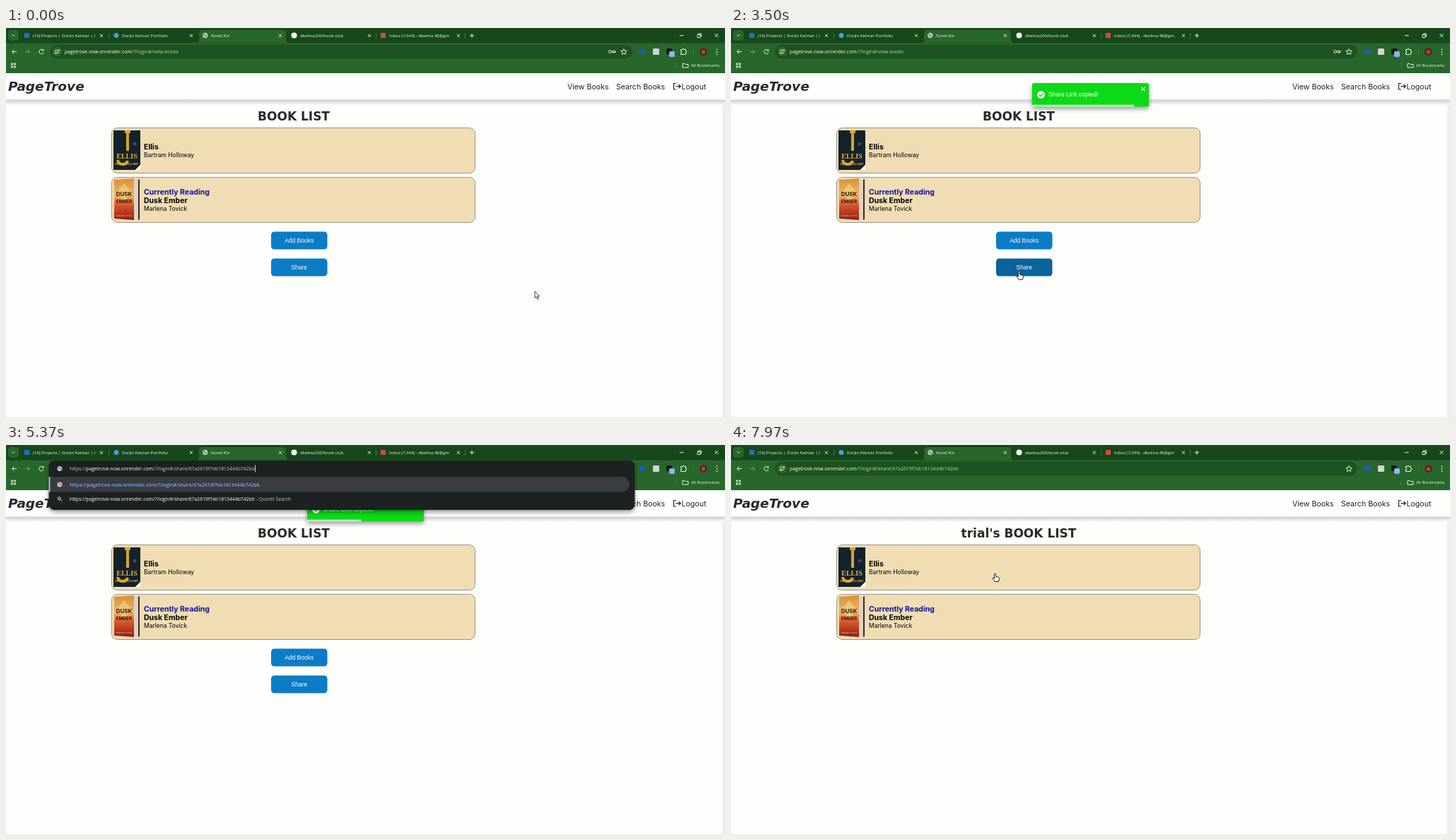
Write an HTML page that moves like this. It is 1017x551 px and loops after 8 s.

```html
<!DOCTYPE html>
<html lang="en">
<head>
<meta charset="utf-8">
<title>Book list demo</title>
<style>
  html, body { margin: 0; width: 100%; height: 100%; overflow: hidden; background: #fdfdfc; }
  svg { display: block; }
  text { font-family: Inter, sans-serif; white-space: pre; }
  .ui text { font: 6.05px "Open Sans", sans-serif; fill: #eef5ee; }
  .ui text.url { font-size: 6.85px; fill: #b9cdba; }
  .ui text.bold { font-weight: 600; fill: #7aa7ee; }
  .lit { fill: #fff; }
  .icon { fill: none; stroke: #e6f0e6; stroke-width: 1; }
  .wide { font: bold 17px "DejaVu Sans", sans-serif; fill: #2b2a2a; }
  .nav { font-size: 10.6px; fill: #222; }
  .name { font-size: 10.5px; font-weight: 700; }
  .author { font-size: 8.5px; }
  .label { font: 8.5px "Liberation Sans", Arial, sans-serif; fill: #fff; }
  .card { fill: #f0ddb4; stroke: #99948b; }
  .mid { text-anchor: middle; }
</style>
</head>
<body>
<svg width="1017" height="551" viewBox="0 0 1017 551">
  <defs>
    <linearGradient id="headShade" x2="0" y2="1">
      <stop stop-color="#c6c8d2"/><stop offset="1" stop-color="#fdfdfc"/>
    </linearGradient>
    <linearGradient id="edgeShade">
      <stop stop-color="#e9e9f4" stop-opacity="0"/><stop offset="1" stop-color="#e6e6f2"/>
    </linearGradient>
    <linearGradient id="fire" x2="0" y2="1">
      <stop stop-color="#d99038"/><stop offset=".4" stop-color="#ecb865"/>
      <stop offset=".65" stop-color="#d9532a"/><stop offset="1" stop-color="#8f1f18"/>
    </linearGradient>
    <filter id="shadow" x="-10%" y="-30%" width="120%" height="180%">
      <feDropShadow dx="0" dy="3" stdDeviation="3" flood-opacity=".4"/>
    </filter>
  </defs>

  <!-- page -->
  <rect width="1017" height="551" fill="#fdfdfc"/>
  <rect x="1011" y="101" width="6" height="450" fill="url(#edgeShade)"/>
  <rect y="101" width="1017" height="8" fill="url(#headShade)"/>
  <rect y="64" width="1017" height="37.5" fill="#fefefe"/>
  <text class="wide" x="3" y="89" style="font-style:oblique;font-size:18.5px">PageTrove</text>
  <text class="nav" x="794" y="86.5">View Books</text>
  <text class="nav" x="863" y="86.5">Search Books</text>
  <text class="nav" x="955.5" y="86.5">Logout</text>
  <path d="M948 78.500h-3.500v8.500h3.500M947.500 82.700h6.500M951.500 80l2.700 2.700-2.700 2.700" fill="none" stroke="#222" stroke-width="1.200"/>

  <g id="list">
    <text id="heading" class="wide mid" x="407" y="131"></text>
    <rect class="card" x="149.500" y="141.500" width="514" height="64" rx="8"/>
    <rect class="card" x="149.500" y="211.500" width="514" height="64" rx="8"/>
    <text class="name" x="195" y="172">Ellis</text>
    <text class="author" x="195" y="183">Bartram Holloway</text>
    <text class="name" x="195" y="235.500" fill="#12129a">Currently Reading</text>
    <text class="name" x="195" y="248">Dusk Ember</text>
    <text class="author" x="195" y="259">Marlena Tovick</text>
    <g id="covers">
      <path d="M152 145h38v49l-7 7h-31z" fill="#14222c"/>
      <path d="M183 201l7-7v7z" fill="#fff"/>
      <path d="M168 147h8M172 147v27M172 188q-1 5-7 5t-7-6" fill="none" stroke="#d9a52e" stroke-width="4"/>
      <circle cx="182" cy="164" r="2.500" fill="#3e4c50"/>
      <text class="mid" x="171" y="185" style="font:bold 10px 'Liberation Serif',serif" fill="#e2b03a">ELLIS</text>
      <text class="mid" x="171" y="194" style="font:bold 3px Inter,sans-serif" fill="#e2b03a">BARTRAM HOLLOWAY</text>
      <path d="M181 215l8-1v57l-8 1z" fill="#ddd2c3"/>
      <path d="M187 215l2-1v57l-2 1z" fill="#3a2a24"/>
      <path d="M153 215l28-2v59l-28-2z" fill="url(#fire)"/>
      <path d="M157 232l10-12 10 12-10 15z" fill="#f2cf83" opacity=".7"/>
      <g class="mid" style="font-weight:700" fill="#33150d">
        <text x="167" y="238" font-size="8">DUSK</text>
        <text x="167" y="248" font-size="6.500">EMBER</text>
      </g>
      <text class="mid" x="167" y="267" font-size="2.600" fill="#f5d9a8">MARLENA TOVICK</text>
    </g>
  </g>
  <g id="buttons">
    <rect id="add" x="375" y="288.500" width="79.500" height="25" rx="4.500"/>
    <rect id="share" x="375" y="326.500" width="79.500" height="25" rx="4.500"/>
    <text class="label mid" x="414.700" y="303.500">Add Books</text>
    <text class="label mid" x="414.700" y="341.700">Share</text>
  </g>

  <g id="toast">
    <rect x="426" y="75" width="165" height="33.500" rx="2" fill="#10da14" filter="url(#shadow)"/>
    <rect id="progress" x="426" y="105.700" height="2.800" fill="#fff" opacity=".75"/>
    <circle cx="438.500" cy="91.500" r="5.300" fill="#fff"/>
    <path d="M436 91.500l2 2 3.500-4" fill="none" stroke="#10da14" stroke-width="1.300"/>
    <text class="label" x="449" y="94.300">Share Link copied!</text>
    <path d="M580.500 81l5 5m0-5l-5 5" stroke="#d8f8d8" stroke-width="1.100"/>
  </g>

  <!-- browser frame -->
  <g class="ui">
    <rect width="1017" height="64" fill="#28672b"/>
    <rect width="1017" height="21.500" fill="#17481c"/>
    <path d="M268 21.500q5 0 5-5V8q0-5 5-5h113q5 0 5 5v8.500q0 5 5 5z" fill="#28672b"/>
    <rect x="3" y="3" width="15" height="15" rx="4.500" fill="#28672b"/>
    <path class="icon" d="M8.500 9.500l2 2 2-2"/>
    <rect x="26" y="7" width="7" height="7" fill="#1a73c4"/>
    <circle cx="156" cy="10.500" r="3.500" fill="#4a9de0"/>
    <circle cx="281.800" cy="10.500" r="3.700" fill="#b7c8b8"/>
    <path d="M279 9l3 1 1 3" stroke="#4b6c4d" fill="none"/>
    <circle cx="407.500" cy="10.500" r="4" fill="#fff"/>
    <rect x="530" y="7" width="7" height="7" fill="#d9483b"/>
    <text x="38" y="13">(16) Projects | Dorjin Kelmar | I</text>
    <text x="164" y="13">Dorjin Kelmar Portfolio</text>
    <text x="290" y="13">Novel Kin</text>
    <text x="416" y="13">dkelma200/book-club</text>
    <text x="542" y="13">Inbox (7,344) - dkelma.48@gm</text>
    <path id="closers" class="icon"/>
    <path class="icon" d="M656 10.700h6m-3-3v6M953 10.700h5.500M978 9.500h4v4h-4zm1.500 0v-1.500h4v4h-1.500M1002.500 8l5 5m0-5l-5 5"/>
    <path d="M145.500 7v8M523.500 7v8M649.500 7v8M972.500 29v9M947.500 49v8" stroke="#3c7a40"/>

    <path class="icon" d="M15 33.500H8.500m3-3l-3 3 3 3M52.500 31.500a3.200 3.200 0 1 0 .5 3M53 29.800v2.400h-2.400"/>
    <path class="icon" d="M27 33.500h6.500m-3-3l3 3-3 3" opacity=".4"/>
    <rect id="omnibox" x="62" y="23.500" width="824" height="20" rx="10"/>
    <circle cx="72.500" cy="33.500" r="6.500" fill="#2e6a32"/>
    <path class="icon" d="M69 31.700h3.500M75 35.300h-3"/>
    <circle class="icon" cx="74.500" cy="31.700" r="1.200"/><circle class="icon" cx="70.300" cy="35.300" r="1.200"/>
    <text class="url" x="83" y="36"><tspan class="lit">pagetrove-now.onrender.com</tspan><tspan id="path"></tspan></text>
    <g id="key" class="icon"><circle cx="854.500" cy="33.500" r="2"/><path d="M857 32.500h5v2h-5m3 0v1.500"/></g>
    <path class="icon" d="M874 29.500l1.200 2.700 3 .3-2.200 2 .6 2.900-2.600-1.500-2.600 1.500 .6-2.900-2.200-2 3-.3z"/>
    <rect x="896" y="30" width="9" height="7" fill="#1b5fae"/>
    <rect x="915" y="29" width="9" height="9" rx="1.500" fill="#d5d2d8"/>
    <rect x="934" y="29" width="8" height="8" rx="1.500" fill="#16181a"/>
    <rect x="938" y="33" width="8" height="8" rx="2" fill="#8fb3ee"/>
    <path class="icon" d="M954.500 30.500h2.500v-1h2v1h2.500v2.500h1v2h-1v2.500h-7v-2.500h1v-2h-1z"/>
    <circle cx="986.500" cy="33.500" r="5.500" fill="#6b2027"/>
    <text class="mid" x="986.500" y="35.700">D</text>
    <path d="M1005.500 29.500v8.500" stroke="#eef5ee" stroke-width="1.500" stroke-dasharray="1.500 2"/>
    <path class="icon" d="M7.500 50h2v2h-2zm4 0h2v2h-2zm-4 4h2v2h-2zm4 0h2v2h-2zM957 50.500h3l1 1h4v4.500h-8z"/>
    <text x="969" y="55.200">All Bookmarks</text>

    <g id="focus">
      <rect x="61" y="23" width="826" height="21" rx="10" fill="#1f2022" stroke="#7aa7ee"/>
      <rect x="82" y="28" width="198" height="11" fill="#3a66b0"/>
      <text class="url" x="83" y="36"><tspan class="lit">https://pagetrove-now.onrender.com/?/login#/view-books</tspan></text>
    </g>
    <g id="popup">
      <rect x="60.500" y="22" width="829" height="70" rx="8" fill="#1f2022" filter="url(#shadow)"/>
      <path d="M62 45h809a10.800 10.800 0 0 1 0 21.600H62z" fill="#3b3c40"/>
      <rect x="60.500" y="45" width="1.800" height="21.600" fill="#a8c7fa"/>
      <g fill="#c9cccd">
        <circle cx="76" cy="33.500" r="3.500"/><circle cx="76" cy="56" r="3.500"/>
      </g>
      <path d="M74 32l3 1 1 3M74 54.500l3 1 1 3" stroke="#55585a" fill="none"/>
      <circle class="icon" cx="75.300" cy="75.800" r="2"/><path class="icon" d="M77 77.500l2.300 2.300"/>
      <text class="url" x="90" y="36"><tspan>https://</tspan><tspan class="lit">pagetrove-now.onrender.com</tspan><tspan id="typed"></tspan></text>
      <path id="caret" stroke="#fff" stroke-width=".8"/>
      <text class="url bold" x="90" y="58.500">https://pagetrove-now.onrender.com/?/login#/share/67a2619f7eb1813444b742bb</text>
      <text class="url" x="90" y="79.300"><tspan class="lit">https://pagetrove-now.onrender.com/?/login#/share/67a2619f7eb1813444b742bb</tspan> - Quorel Search</text>
    </g>
  </g>

  <g id="cursor" stroke-linejoin="round">
    <path id="arrow" d="M0 0v9.500l2.200-2 1.500 3.500 1.600-.7-1.500-3.400h3z" fill="#fff" stroke="#111" stroke-width=".8"/>
    <path id="hand" d="M-1 .8q1-1.400 2 0v4l4 1q1 .4 1 1.600-.2 2.500-1.200 4.600h-5L-3.300 8q-.6-1.600 .8-1.400l1.500 1.200z" fill="#fff" stroke="#111" stroke-width=".9"/>
    <path id="beam" d="M-1.700-4.500h3.400M0-4.500v9M-1.700 4.500h3.400" fill="none" stroke="#0b1a0c" stroke-width=".9"/>
  </g>
</svg>

<script>
const LOOP = 8000;
const PASTE = 5150, ENTER = 6130, LOADED = 6350, COVERS = 6850;
const TOAST_IN = 2915, TOAST_OUT = 7480, BOUNCE = 640;
const SHARE_PATH = '/?/login#/share/67a2619f7eb1813444b742bb';

const $ = id => document.getElementById(id);
const show = (id, on) => $(id).style.display = on ? '' : 'none';
const smooth = u => u * u * (3 - 2 * u);
const easeOut = u => 1 - (1 - u) ** 3;

// Rows are [time, value, value, ...]
function tween(rows, t, ease) {
  const i = rows.findIndex(row => row[0] > t);
  if (i < 0) return rows[rows.length - 1].slice(1);
  if (i === 0) return rows[0].slice(1);
  const a = rows[i - 1], b = rows[i];
  const u = ease((t - a[0]) / (b[0] - a[0]));
  return a.slice(1).map((v, k) => v + (b[k + 1] - v) * u);
}

const mouse = [
  [0, 748, 373], [450, 746, 377], [830, 741, 369], [1060, 737, 366], [1200, 737, 366],
  [1460, 661, 269.5], [1950, 425, 342], [2300, 431, 351], [2950, 431, 351],
  [3250, 424, 376], [3650, 400, 330], [4180, 309, 53], [4360, 309, 53],
  [4550, 300.5, 37.5], [7050, 300.5, 37.5], [7500, 410, 35], [7800, 424, 37], [7960, 373.5, 181.5]
];
const enter = [[0, -3000, 0], [.6, 25, 1], [.75, -10, 1], [.9, 5, 1], [1, 0, 1]];
const leave = [[0, 0, 1], [.2, -10, 1], [.4, 20, 1], [.45, 20, 1], [1, -2000, 0]];

$('closers').setAttribute('d', [135, 262, 388, 514, 640].map(x => `M${x - 2} 8.700l4 4m0-4l-4 4`).join(''));
$('typed').textContent = SHARE_PATH;

function draw(now) {
  const t = now % LOOP;
  const shared = t >= ENTER;
  const [x, y] = tween(mouse, t, smooth);
  const over = (l, top, r, b) => x >= l && x <= r && y >= top && y <= b;

  show('list', !shared || t >= LOADED);
  show('covers', !shared || t >= COVERS);
  show('buttons', !shared);
  show('key', !shared);
  $('heading').textContent = (shared ? "trial's " : '') + 'BOOK LIST';
  $('path').textContent = shared ? SHARE_PATH : '/?/login#/view-books';
  show('focus', t >= 4600 && t < PASTE);
  show('popup', t >= PASTE && t < ENTER + 45);
  if (t >= PASTE && t < ENTER + 45) {
    const end = 90.500 + $('typed').parentNode.getComputedTextLength();
    $('caret').setAttribute('d', `M${end} 28.500v10`);
  }

  const onAdd = !shared && over(375, 288, 454, 313);
  const onShare = !shared && over(375, 326, 454, 352);
  const onCard = over(149, 141, 664, 205) || over(149, 211, 664, 275);
  const onUrl = over(62, 23, 886, 43);
  $('add').style.fill = onAdd ? '#0a639c' : '#0b7cc5';
  $('share').style.fill = onShare ? '#0a639c' : '#0b7cc5';
  $('omnibox').style.fill = onUrl ? '#225b26' : '#1d5321';

  const toastOn = t >= TOAST_IN && t < TOAST_OUT + BOUNCE;
  show('toast', toastOn);
  if (toastOn) {
    const [dy, alpha] = t < TOAST_OUT
      ? tween(enter, (t - TOAST_IN) / BOUNCE, easeOut)
      : tween(leave, (t - TOAST_OUT) / BOUNCE, smooth);
    $('toast').setAttribute('transform', `translate(0 ${dy})`);
    $('toast').setAttribute('opacity', alpha);
    const left = Math.max(0, (TOAST_OUT - t) / (TOAST_OUT - TOAST_IN));
    $('progress').setAttribute('width', 165 * left);
  }

  const hand = onCard || onAdd || onShare;
  show('cursor', t < PASTE - 50 || t > ENTER + 150);
  show('hand', hand);
  show('beam', onUrl);
  show('arrow', !hand && !onUrl);
  $('cursor').setAttribute('transform', `translate(${x} ${y})`);
  requestAnimationFrame(draw);
}
requestAnimationFrame(draw);
</script>
</body>
</html>
```
